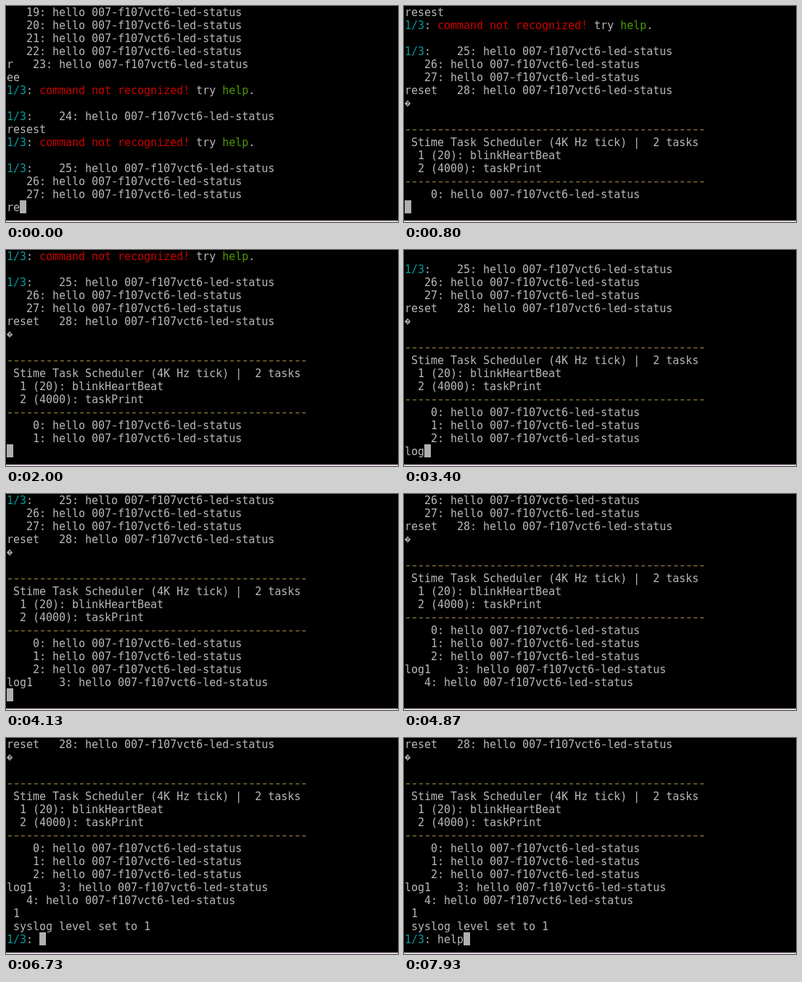
Animation of 540 by 299 pixels, one loop 8000 ms. Source, as an HTML page with a canvas:

```html
<!DOCTYPE html>
<html lang="en">
<head>
<meta charset="utf-8">
<title>Serial terminal</title>
<style>
  html, body { margin: 0; width: 100%; height: 100%; overflow: hidden; background: #000; }
  canvas { display: block; width: 540px; height: 299px; }
</style>
</head>
<body>
<canvas id="screen" width="540" height="299"></canvas>
<script>
const ctx = document.getElementById('screen').getContext('2d');
const LOOP = 8000, BLINK = 600;
const CELL = 9, LINE = 18, ROWS = 16, LEFT = 1;

// Private markers switch the text colour.
const COLORS = {
  '\x01': '#b8b8b8', '\x02': '#cc0000', '\x03': '#4e9a06', '\x04': '#06989a', '\x05': '#a58f45'
};
const red = s => '\x02' + s + '\x01';
const green = s => '\x03' + s + '\x01';
const prompt = '\x041/3\x01: ';

const hello = (n, pad = 3) => ' '.repeat(pad) + n + ': hello 007-f107vct6-led-status\n';
const unknown = prompt + red('command not recognized!') + ' try ' + green('help') + '.\n\n' + prompt;
const rule = '\x05' + '-'.repeat(46) + '\n';
const banner = '\uFFFD\n\n' + rule +
  ' Stime Task Scheduler (4K Hz tick) |  2 tasks\n' +
  '  1 (20): blinkHeartBeat\n' +
  '  2 (4000): taskPrint\n' + rule;

const start = [19, 20, 21, 22].map(n => hello(n)).join('') +
  'r' + hello(23) + 'ee\n' + unknown + hello(24) +
  'resest\n' + unknown + hello(25) + hello(26) + hello(27) + 're';

const output = [
  [530, hello(28)],
  [740, banner],
  [790, hello(0, 4)],
  [1790, hello(1, 4)],
  [2790, hello(2, 4)],
  [3790, hello(3, 4)],
  [4790, hello(4)],
  [5540, ' 1\n syslog level set to 1\n' + prompt]
];
// An empty key is Enter, which is not echoed.
const keys = [
  [130, 's'], [270, 'e'], [400, 't'], [730, ''],
  [2930, 'l'], [3070, 'o'], [3270, 'g'], [3730, '1'], [5530, ''],
  [7330, 'h'], [7470, 'e'], [7670, 'l'], [7800, 'p']
];
const feed = [...output, ...keys].sort((a, b) => a[0] - b[0]);

function drawReplacement(x, y) {
  ctx.beginPath();
  ctx.moveTo(x + 4, y + 4.5);
  ctx.lineTo(x + 8, y + 9);
  ctx.lineTo(x + 4, y + 13.5);
  ctx.lineTo(x, y + 9);
  ctx.fill();
  ctx.save();
  ctx.fillStyle = '#000';
  ctx.font = 'bold 7px "DejaVu Sans Mono", monospace';
  ctx.fillText('?', x + 4, y + 11.5);
  ctx.restore();
}

// Draws one row and returns the column after its last character.
function drawLine(text, row) {
  let col = 0;
  ctx.fillStyle = COLORS['\x01'];
  for (const ch of text) {
    if (COLORS[ch]) {
      ctx.fillStyle = COLORS[ch];
      continue;
    }
    const x = LEFT + col * CELL, y = row * LINE;
    if (ch === '\uFFFD') drawReplacement(x, y);
    else if (ch === '-') ctx.fillRect(x + 2, y + 9, 5, 1);
    else if (ch !== ' ') ctx.fillText(ch, x + CELL / 2, y + 14);
    col++;
  }
  return col;
}

function draw(t) {
  ctx.fillStyle = '#000';
  ctx.fillRect(0, 0, 540, 299);
  ctx.fillStyle = '#dcd0dc';
  ctx.fillRect(0, 297, 540, 2);

  ctx.font = '15px "DejaVu Sans Mono", monospace';
  ctx.textAlign = 'center';
  ctx.textBaseline = 'alphabetic';

  const text = start + feed.filter(e => e[0] <= t).map(e => e[1]).join('');
  const lines = text.split('\n').slice(-ROWS);
  let col = 0;
  lines.forEach((line, row) => { col = drawLine(line, row); });

  const lastKey = keys.reduce((last, k) => k[0] <= t ? k[0] : last, 0);
  if (Math.floor((t - lastKey) / BLINK) % 2 === 0) {
    ctx.fillStyle = '#b0b0b0';
    ctx.fillRect(LEFT + col * CELL, (lines.length - 1) * LINE - 1, CELL, LINE);
  }
}

const origin = performance.now();
function tick() {
  draw((performance.now() - origin) % LOOP);
  requestAnimationFrame(tick);
}
tick();
</script>
</body>
</html>
```
